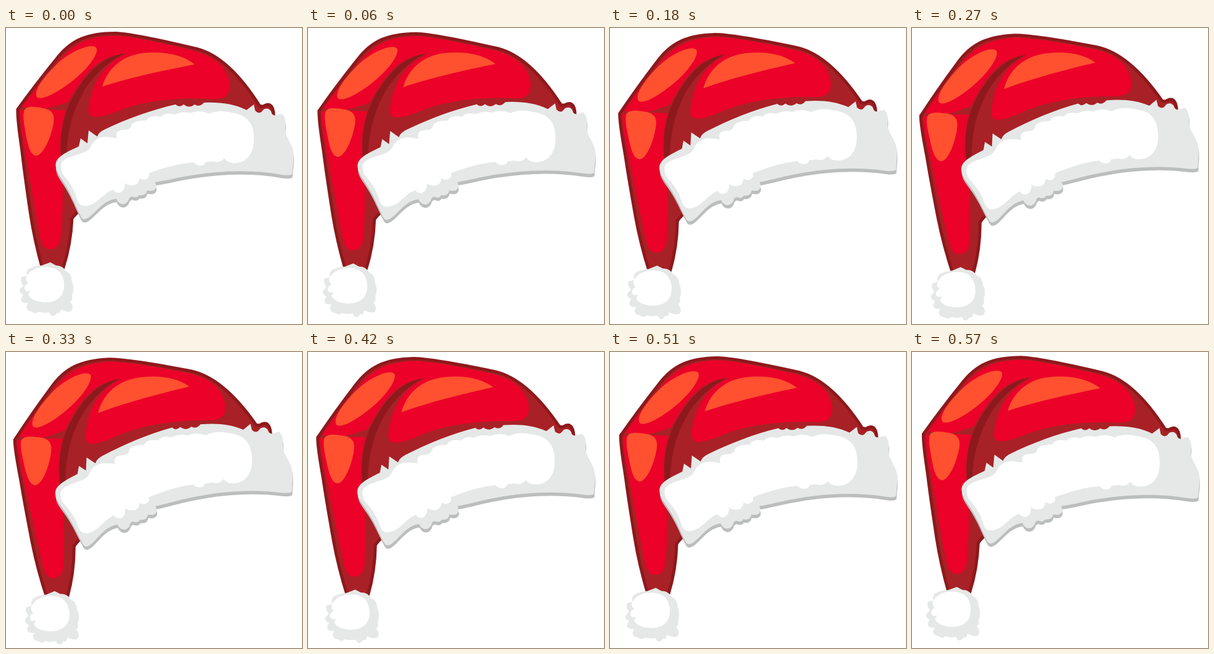
An HTML page with a canvas that plays this animation: 480x480 px, repeating every 0.6 s.

```html
<!DOCTYPE html>
<html lang="en">
<head>
<meta charset="utf-8">
<title>Santa hat</title>
<style>
html, body { margin: 0; width: 100%; height: 100%; overflow: hidden; background: #fff; }
canvas { display: block; width: 480px; height: 480px; }
</style>
</head>
<body>
<canvas id="stage" width="480" height="480"></canvas>
<script>
const ctx = document.getElementById('stage').getContext('2d');
const LOOP = 600, STEP = 30, SWING = 3 * Math.PI / 180;
const EDGE = '#8d191c', DARK = '#a82126', RED = '#ec0128', ORANGE = '#ff5030';
const FUR = '#e5e8e7', SHADE = '#bcbebd', WHITE = '#fff';

const cloth = new Path2D(`M59 390 C50 358 44 330 39.5 300 C34 262 30 235 26 200
  C22 170 18.5 150 19 132 C37 107 60 77 82 50 C106 19 132 8.5 178 8.5
  C205 9.5 260 22 310 34 C348 44 382 80 411 126 Q416 128 419 126 Q427 122 431 128
  Q434 133 434 142 L400 160 L118 297 Q110 304 107 309 Q105 352 92.5 390 Z`);

const fold = new Path2D(`M90 214 C85 165 96 125 122 90 C142 62 165 44 194 41
  C170 51 147 72 131 95 C110 128 99 165 98 208 Z`);

const redTop = new Path2D(`M26 128 C44 102 64 80 84 56 C109 24 135 13 178 12.5
  C205 13.5 262 26 308 38 C340 48 357 63 362 87 C365 108 356 116 335 115
  C275 112 230 118 194 130 C175 137 158 145 143 144 C133 143 132 134 136 119
  C143 84 160 57 196 41 C164 43 140 60 121 88 C112 101 106 111 101 120
  C88 124 76 128 64 131 Z`);

const redSide = new Path2D(`M23 133 L64 132 Q82 132 97 134 C89 160 86 185 89 212
  C94 255 92 295 89 336 C87 354 80 359 71 359 C61 358 57 350 54 333
  C45 285 38 240 31 200 C26 170 22 150 23 133 Z`);

const glows = [
  'M50 112 C45 103 56 85 80 61 C105 36 141 23 147 33 C150 44 130 69 105 88 C80 107 57 118 50 112 Z',
  'M29 135 C32 126 44 127 60 130 C78 133 80 144 76 160 C70 186 58 207 49 207 C39 206 35 190 31 165 Q27 145 29 135 Z',
  'M156 95 C165 65 190 42 230 40 C265 38 290 46 306 59 C265 67 205 79 156 95 Z'
].map(d => new Path2D(d));

const band = new Path2D(`M81 226 C78 211 92 204 118 192 L121 179 L132 187 L134 166 L148 176
  Q150 169 161 164 C197 147 235 133 275 124 Q281 130 288 124 Q297 131 306 124
  Q314 129 321 121 C347 120 370 123 390 133 L402 124 L404 134 Q411 141 416 134
  Q419 130 425 131 Q430 133 431 139 Q434 143 439 141 L448 139 Q455 147 453 160
  C451 173 460 182 465 196 Q468 208 465 225 L464 237 Q460 240 447 238
  C402 230 353 231 307 238 C284 241 263 247 242 250 Q247 261 237 264
  Q230 264 229 263 Q227 273 216 271 Q212 277 204 273 Q199 275 199 279
  Q193 289 184 284 Q180 281 179 277 C160 279 149 295 137 305 Q125 315 121 305
  C114 291 109 277 100 261 C92 246 82 236 81 226 Z`);

const bandWhite = new Path2D(`M89 225 Q87 215 104 209 C123 203 133 202 138 191
  C144 180 154 175 167 177 Q177 178 180 179 Q176 166 190 165 Q203 166 204 156
  Q211 149 228 150 Q233 140 251 144 Q258 136 273 140 Q286 134 299 138
  Q314 132 329 139 Q346 132 364 137 C389 140 402 153 402 178 C403 206 388 219 371 219
  Q359 219 354 211 Q347 220 335 216 Q329 217 324 217 Q322 224 314 223 Q307 222 305 218
  C281 219 256 227 232 235 Q234 243 225 246 Q219 246 217 243 Q214 257 203 255
  Q196 255 193 251 Q193 264 185 267 Q177 268 174 262 C160 267 152 280 139 286
  C125 292 118 288 115 277 C109 256 99 246 92 237 Q89 232 89 225 Z`);

const pom = new Path2D(`M36 391 Q45 385 58 385 L72 380 L81 385 Q92 385 98 395 Q107 399 107 412
  Q112 422 107 434 Q109 441 104 444 Q111 452 106 459 Q101 461 96 459 Q92 458 89 456
  Q87 465 82 462 Q79 469 73 466 L70 461 Q61 463 53 460 Q48 465 42 460 Q34 459 33 452
  L36 446 Q23 447 25 438 L28 433 Q21 430 22 424 L28 418 Q22 410 25 404 L34 402 Q32 396 36 391 Z`);

const pomWhite = new Path2D(`M36 399 C46 386 67 385 81 391 C94 398 97 417 92 430
  C86 443 70 447 56 444 Q41 442 36 432 L40 426 Q31 429 30 422 Q30 416 36 414 Q29 406 36 399 Z`);

function fill(path, color) {
  ctx.fillStyle = color;
  ctx.fill(path);
}

function drawHat() {
  fill(cloth, DARK);
  fill(fold, EDGE);
  fill(redTop, RED);
  fill(redSide, RED);
  glows.forEach(p => fill(p, ORANGE));
  ctx.strokeStyle = EDGE;
  ctx.lineWidth = 5;
  ctx.stroke(cloth);

  ctx.save();
  ctx.translate(0.5, 5.5);
  fill(band, SHADE);
  ctx.restore();
  fill(band, FUR);
  fill(bandWhite, WHITE);
  fill(pom, FUR);
  fill(pomWhite, WHITE);
}

function render(now) {
  // the swing advances in 30 ms steps: out for half the loop, then back
  const time = Math.floor((now % LOOP) / STEP) * STEP;
  const phase = 1 - Math.abs(2 * time / LOOP - 1);
  ctx.fillStyle = WHITE;
  ctx.fillRect(0, 0, 480, 480);
  ctx.save();
  ctx.translate(240, 240);
  ctx.rotate(-SWING * phase);
  ctx.translate(-240, -240);
  drawHat();
  ctx.restore();
}

const start = performance.now();
function tick() {
  render(performance.now() - start);
  requestAnimationFrame(tick);
}
tick();
</script>
</body>
</html>
```
